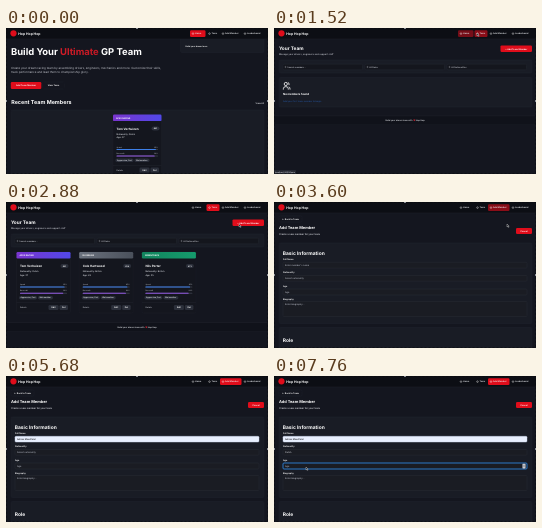
These frames come from a looping animation (262x146 px, 8 s). An HTML page:

```html
<!DOCTYPE html>
<html lang="en">
<head>
<meta charset="utf-8">
<title>Team builder</title>
<style>
html, body { margin: 0; width: 100%; height: 100%; overflow: hidden; background: #14161f; }
svg { display: block; width: 100vw; height: 100vh; }
text { font-family: Inter, "Open Sans", sans-serif; text-rendering: geometricPrecision; white-space: pre; }
</style>
</head>
<body>
<svg id="stage" viewBox="0 0 262 146"></svg>
<script>
const LOOP = 8000;
const C = {
  page: '#14161f', nav: '#0c0e14', panel: '#191c25', field: '#1a1c23', line: '#2c2f38',
  red: '#e00d1b', white: '#ffffff', grey: '#c0c3cb', dim: '#a9adb7', blue: '#3d7fe8'
};
const stage = document.getElementById('stage');

const rect = (x, y, w, h, fill, r = 0, stroke = 'none', extra = '') =>
  `<rect x="${x}" y="${y}" width="${w}" height="${h}" rx="${r}" fill="${fill}" stroke="${stroke}" stroke-width=".4" ${extra}/>`;
const text = (x, y, s, size, fill = C.white, weight = 500, anchor = 'start') =>
  `<text x="${x}" y="${y}" font-size="${size}" fill="${fill}" font-weight="${weight}" text-anchor="${anchor}">${s}</text>`;
const group = (id, content) => `<g id="${id}">${content}</g>`;
const panel = (x, y, w, h) => rect(x, y, w, h, C.panel, 1.2, '#222530');
const button = (x, y, w, h, label, fill = C.red, stroke = 'none') =>
  rect(x, y, w, h, fill, 1.2, stroke) + text(x + w / 2, y + h / 2 + .8, label, 2.2, C.white, 600, 'middle');

const NAV = [['home', 184, 15.5, 'Home'], ['team', 200.5, 13, 'Team'], ['add', 214, 21.5, 'Add Member'], ['board', 236, 21, 'Leaderboard']];

function navBar() {
  const items = NAV.map(([id, x, w, label]) =>
    rect(x, 2.3, w, 6.6, C.red, 1.2, 'none', `id="pill-${id}"`) +
    `<circle cx="${x + 3}" cy="5.6" r=".8" fill="none" stroke="${C.white}" stroke-width=".4"/>` +
    text(x + 5, 6.4, label, 2.2, '#eceef2')).join('');
  return rect(0, 0, 262, 11, C.nav) + rect(0, 10.8, 262, .3, '#232630') +
    `<circle cx="7.5" cy="5.3" r="3.1" fill="${C.red}"/>` +
    text(12.3, 6.7, 'Hop Hop Hop', 3.45, C.white, 700) + items;
}

function card(x, y, w, driver) {
  const [team, name, nation, age, number, from, to, id] = driver;
  const bar = (dy, label, value, color) =>
    text(x + 3.5, y + dy, label, 1.7, C.grey) + text(x + w - 3.5, y + dy, Math.round(value * 100) + '%', 1.7, C.grey, 500, 'end') +
    rect(x + 3.5, y + dy + 1.5, w - 7, 1, '#343844', .5) + rect(x + 3.5, y + dy + 1.5, (w - 7) * value, 1, color, .5);
  return `<linearGradient id="${id}"><stop stop-color="${from}"/><stop offset="1" stop-color="${to}"/></linearGradient>` +
    rect(x, y, w, 61, '#14161e', 1.5, '#20232c') + rect(x, y, w, 6.5, `url(#${id})`, 1.2) +
    text(x + 3, y + 4.1, team, 2.1, C.white, 700) +
    text(x + 3.5, y + 15, name, 3, C.white, 700) +
    rect(x + w - 10, y + 12, 8, 4, '#2b2f3a', 2) + text(x + w - 6, y + 14.8, number, 2, C.white, 600, 'middle') +
    text(x + 3.5, y + 20.2, 'Nationality: ' + nation, 2.2, '#dcdee4') +
    text(x + 3.5, y + 23.8, 'Age: ' + age, 2.2, '#dcdee4') +
    bar(33, 'Speed', .95, C.blue) + bar(39.3, 'Racecraft', .92, '#8f56dd') +
    rect(x + 2.5, y + 44, 18, 3.4, '#2b2f3b', 1.6) + text(x + 4, y + 46.4, 'Aggressive, Fast', 1.9, '#eceef2') +
    rect(x + 21.5, y + 44, 15, 3.4, '#2b2f3b', 1.6) + text(x + 23, y + 46.4, 'Wet weather', 1.9, '#eceef2') +
    rect(x, y + 50.5, w, .3, '#292c37') + text(x + 3.5, y + 56.1, 'Details', 2, C.grey) +
    button(x + w - 22, y + 53, 10, 5, 'Edit', '#2b2f3a') + button(x + w - 11, y + 53, 8.5, 5, 'Del', '#2b2f3a');
}

const DRIVERS = [
  ['APEX RACING', 'Tom Verhuizen', 'Dutch', 27, '#41', '#7a35cf', '#5148e8', 'violet'],
  ['SILVERLINE', 'Cole Hartwood', 'British', 39, '#58', '#6b727e', '#4a505b', 'silver'],
  ['GREENTRACK', 'Nils Porter', 'British', 25, '#73', '#12835e', '#159c6d', 'green']
];

function home() {
  return rect(0, 0, 262, 146, C.page) + panel(174.5, 9, 83.5, 15.5) +
    text(179.5, 19.3, 'Build your dream team', 2, C.white, 600) +
    `<linearGradient id="hot"><stop stop-color="#e8202c"/><stop offset="1" stop-color="#b3141f"/></linearGradient>` +
    text(5, 27.3, 'Build Your <tspan fill="url(#hot)">Ultimate</tspan> GP Team', 9.45, C.white, 700) +
    text(5, 41.2, 'Create your dream racing team by assembling drivers, engineers, mechanics and more. Customize their skills,', 2.9, C.grey, 400) +
    text(5, 45, 'track performance and lead them to championship glory.', 2.9, C.grey, 400) +
    button(4.8, 54, 30.5, 7, 'Add Team Member') + button(36.5, 54, 22, 7, 'View Team', C.page, '#1d2029') +
    text(5.2, 76, 'Recent Team Members', 5.4, C.white, 700) + text(258, 75.7, 'View All', 2.2, '#eceef2', 500, 'end') +
    panel(5, 82, 253, 70) + card(107, 86.6, 48.5, [...DRIVERS[0].slice(0, 7), 'hero']);
}

function footer(y) {
  return rect(0, y, 262, 9, '#10121a') + rect(0, y, 262, .3, '#292c36') +
    text(131, y + 5.2, 'Build your dream team with <tspan fill="#e02533">♥</tspan> Hop Hop', 2.1, '#e2e4e9', 500, 'middle') +
    rect(0, y + 8.8, 262, .3, '#20232c');
}

function team() {
  const inputs = ['Search members...', 'All Roles', 'All Nationalities'].map((label, i) =>
    rect(9 + i * 82, 36.2, 79.5, 5.6, '#14161d', 1, '#282b34') +
    `<circle cx="${11.5 + i * 82}" cy="39" r=".6" fill="none" stroke="${C.grey}" stroke-width=".3"/>` +
    text(13.3 + i * 82, 39.8, label, 2.1, C.grey)).join('');
  const people = `<g fill="none" stroke="${C.white}" stroke-width=".8"><circle cx="11.8" cy="56" r="1.6"/>` +
    `<path d="M9.3 61.6v-.8q0-2.2 2.5-2.2t2.5 2.2v.8M13.8 54.5q1.8.3 1.2 2.6M14.9 58.8q1.2.5 1.2 2.8"/></g>`;
  return rect(0, 0, 262, 146, C.page) +
    text(4.9, 22.3, 'Your Team', 4.75, C.white, 700) +
    text(5, 26.8, 'Manage your drivers, engineers and support staff', 2.3, C.grey) +
    button(226.5, 17.4, 31.5, 6.6, '+ Add Team Member') + panel(5, 32, 253, 13) + inputs +
    group('empty', panel(5, 49.5, 253, 29.5) + people +
      text(9, 67.3, 'No members found', 2.8, C.white, 700) +
      text(9, 73.7, 'Add your first team member to begin', 2.2, '#244d8f') + footer(87.8)) +
    group('cards', DRIVERS.map((d, i) => card(10.5 + i * 62.7, 50, 54, d)).join('') + footer(120.5));
}

const FIELDS = [['Full Name', 58, 60.3, 5.8, "Enter member's name"], ['Nationality', 71.3, 73.5, 5.7, 'Select nationality'],
  ['Age', 84.8, 87, 6, 'Age'], ['Biography', 98, 99.5, 15, 'Enter biography...']];
const NATIONS = 'Select nationality|Argentine|Australian|Austrian|Belgian|Brazilian|British|Canadian|Chinese|Danish|Dutch|Finnish|French|German|Indian|Italian|Japanese|Mexican|Monegasque'.split('|');

function form() {
  const fields = FIELDS.map(([label, ly, y, h, hint], i) =>
    text(9, ly, label, 2.2, C.white, 600) +
    rect(9, y, 244, h, C.field, 1, C.line, `id="field${i}"`) +
    `<text id="value${i}" x="11" y="${y + 3.8}" font-size="2.3" font-weight="500" fill="${C.dim}">${hint}</text>`).join('');
  return rect(0, 0, 262, 146, C.page) +
    button(5, 14, 23, 6, '← Back to Team', C.page, '#22252e') +
    text(4.9, 27.3, 'Add Team Member', 3.95, C.white, 700) +
    text(5, 32.8, 'Create a new member for your team', 2.4, '#dcdee4') +
    button(242, 26, 16, 6, 'Cancel') +
    panel(5, 41, 253, 80.5) + text(8.8, 53.4, 'Basic Information', 4.9, C.white, 700) + fields +
    panel(5, 125.5, 253, 30) + text(8.8, 139.6, 'Role', 4.9, C.white, 700) +
    group('spinner', rect(248.5, 87.7, 3, 4.7, '#d8dae0', .4) +
      `<path d="M249.2 89.6l.8-1 .8 1zM249.2 90.5l.8 1 .8-1z" fill="#353943"/>`);
}

function dropdown() {
  return rect(8.5, 73.5, 243.5, 70.5, '#1b1e28', .7, '#31343f') +
    rect(9, 102.3, 242, 4, '#3c43ad', 0, 'none', 'id="highlight"') +
    Array.from({ length: 17 }, (_, i) => `<text class="option" x="11" y="${77.3 + i * 4}" font-size="2.2" font-weight="500" fill="#e6e8ec"/>`).join('');
}

stage.innerHTML = group('home', home()) + group('team', team()) + group('form', form()) +
  group('list', dropdown()) + navBar() +
  group('status', rect(0, 142, 22, 4, '#252831', .5) + text(1, 144.7, 'localhost:3000/team', 2, '#d3d5db')) +
  group('cursor', '<path d="M0 0V3l.75-.65.5 1.1.55-.25-.5-1.05H2.2Z" fill="#0b0c10" stroke="#fff" stroke-width=".35"/>') +
  '<rect x=".3" y=".3" width="261.4" height="145.4" fill="none" stroke="#08090c" stroke-width=".6" stroke-dasharray="2 2"/>' +
  rect(0, 72, 1, 2, '#8a8e96') + rect(261, 72, 1, 2, '#8a8e96') + rect(130, 0, 2, 1, '#8a8e96');

const $ = id => document.getElementById(id);
const options = [...document.querySelectorAll('.option')];
const show = (id, on) => $(id).setAttribute('display', on ? 'inline' : 'none');
const set = (id, attrs) => Object.entries(attrs).forEach(([k, v]) => $(id).setAttribute(k, v));

// Each path holds [start, end, x, y]: the pointer eases to x, y between both times.
const POINTER = [[80, 160, 190, 22], [1120, 1200, 203, 5], [2400, 2880, 233, 22], [4640, 4640, 144.5, 60.5],
  [5120, 5120, 37, 82], [5280, 5280, 34, 79], [5440, 5440, 30, 64], [5680, 5680, 30, 76],
  [6160, 6160, 30, 81], [6480, 6560, 30, 106], [6880, 6960, 30, 100], [7280, 7280, 31, 97], [7760, 7760, 32, 91]];

function pointerAt(t) {
  let x = 125, y = 66;
  for (const [start, end, px, py] of POINTER) {
    if (t < start) break;
    const k = end === start ? 1 : Math.min(1, (t - start + 80) / (end - start + 80));
    const e = k * k * (3 - 2 * k);
    x += (px - x) * e;
    y += (py - y) * e;
  }
  return [x, y];
}

function render(time) {
  const t = Math.floor((time % LOOP) / 80) * 80;
  const page = t < 1520 ? 'home' : t < 3600 ? 'team' : 'form';
  ['home', 'team', 'form'].forEach(id => show(id, id === page));
  show('empty', t < 1680);
  show('cards', t >= 1680);

  const switching = t >= 1520 && t < 1680;
  set('pill-home', { opacity: page === 'home' ? 1 : switching ? .5 : 0 });
  set('pill-team', { opacity: page === 'team' ? (switching ? .6 : 1) : t >= 1200 && page === 'home' ? .12 : 0 });
  set('pill-add', { opacity: page === 'form' ? (t < 3680 ? .6 : 1) : 0 });
  set('pill-board', { opacity: 0 });
  show('status', t >= 1520 && t < 2400);

  const filled = t >= 5440, focused = t >= 7760, chosen = t >= 7280;
  set('field0', { fill: filled ? '#e8effe' : C.field, stroke: filled ? '#c5d0e8' : C.line });
  set('value0', { fill: filled ? '#14161c' : C.dim });
  $('value0').textContent = filled ? 'Adrian Moorfield' : FIELDS[0][4];
  $('value1').textContent = chosen ? 'Dutch' : FIELDS[1][4];
  set('value1', { fill: chosen ? C.grey : C.dim });
  set('field2', { stroke: focused ? '#2d82d8' : C.line, 'stroke-width': focused ? .9 : .4 });
  show('spinner', focused);

  show('list', t >= 6160 && t < 7280);
  const row = t < 6480 ? 1 : t < 6560 ? 4 : t < 6880 ? 7 : 6;
  set('highlight', { y: 74.4 + row * 4 });
  const scroll = t < 6880 ? 0 : t < 6960 ? 1 : 2;
  options.forEach((option, i) => { option.textContent = NATIONS[i + scroll]; });

  const [x, y] = pointerAt(t);
  set('cursor', { transform: `translate(${x} ${y})` });
  show('cursor', t >= 80 && !(t >= 5680 && t < 6160));
}

const began = performance.now();
function tick() {
  render(performance.now() - began);
  requestAnimationFrame(tick);
}
tick();
</script>
</body>
</html>
```
